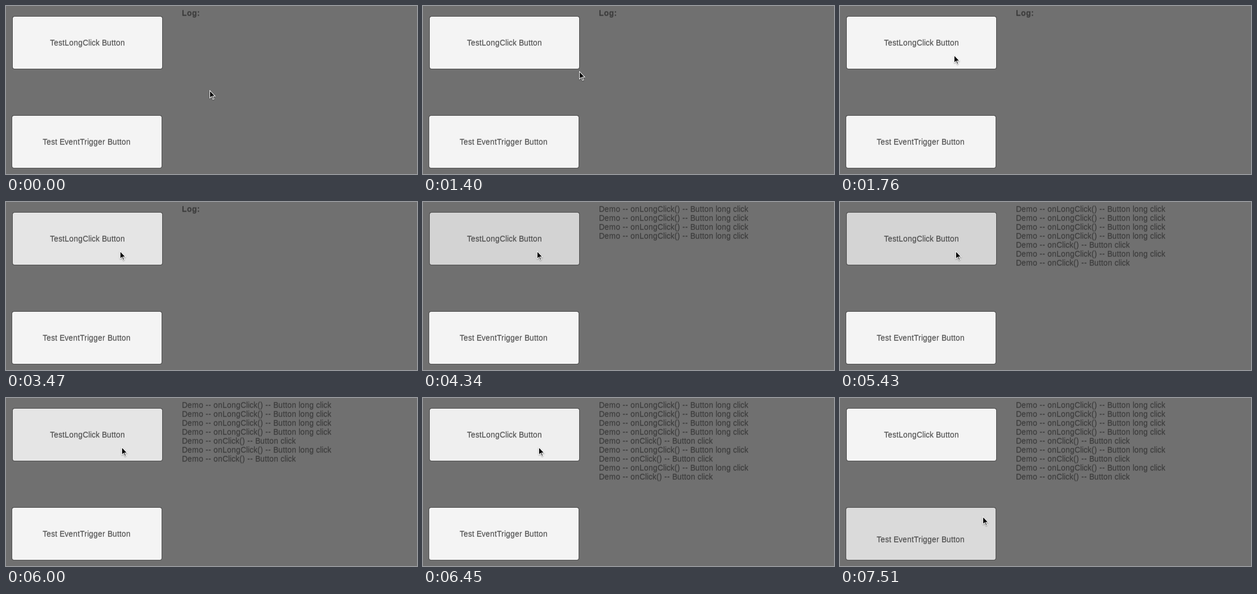
Animation, 729 px wide and 300 px high, one loop 8 s. Source, as an HTML page with a canvas:

```html
<!DOCTYPE html>
<html lang="en">
<head>
<meta charset="utf-8">
<title>Long click demo</title>
<style>
  html, body { margin: 0; width: 100%; height: 100%; overflow: hidden; background: #707070; }
  canvas { display: block; }
</style>
</head>
<body>
<canvas id="stage" width="729" height="300"></canvas>
<script>
const ctx = document.getElementById('stage').getContext('2d');
const LOOP = 8000;
const FONT = '14px "Liberation Sans", Arial, sans-serif';
const IDLE = 244, PRESSED = 211;
const HOLD_DELAY = 220, REPEAT = 210;

const longPresses = [
  { down: 3470, up: 4420 },
  { down: 5010, up: 5430 },
  { down: 6000, up: 6400 }
];
const triggerPresses = [{ down: 7480, up: Infinity }];

const moves = [
  { start: 750, end: 1760, from: [361, 150], bend: [282, 118], to: [202, 87] },
  { start: 4820, end: 4870, from: [202, 87], bend: [203, 87], to: [205, 87] },
  { start: 6620, end: 6970, from: [205, 87], bend: [316, 155], to: [253, 211] }
];

// Holding repeats the long click; letting go adds a click
const log = longPresses.flatMap(({ down, up }) => {
  const lines = [];
  for (let time = down + HOLD_DELAY; time < up; time += REPEAT) {
    lines.push({ time, text: 'Demo -- onLongClick() -- Button long click' });
  }
  return [...lines, { time: up, text: 'Demo -- onClick() -- Button click' }];
});

const clamp = u => Math.min(1, Math.max(0, u));

// Slow start, quick late middle, soft stop
function ease(u) {
  const v = clamp(u) ** 1.5;
  return v * v * v * (v * (6 * v - 15) + 10);
}

function shadeAt(presses, t) {
  const press = presses.findLast(p => t >= p.down);
  if (!press) return IDLE;
  const depth = t < press.up
    ? clamp((t - press.down + 40) / 90)
    : 1 - clamp((t - press.up) / 60);
  return Math.round(IDLE + (PRESSED - IDLE) * depth);
}

function pointerAt(t) {
  const { start, end, from, bend, to } = moves.findLast(m => t >= m.start) || moves[0];
  const u = ease((t - start) / (end - start)), v = 1 - u;
  return from.map((a, i) => Math.round(v * v * a + 2 * v * u * bend[i] + u * u * to[i]));
}

// Kerned advances snapped to whole pixels
function advances(text) {
  const width = s => ctx.measureText(s).width;
  return [...text].map((ch, i) => {
    const next = text[i + 1] || '';
    return Math.round(width(ch + next) - width(next));
  });
}

// Two overlapping passes give the soft vertical edges
function drawText(text, x, y) {
  ctx.fillStyle = 'rgba(50, 50, 50, 0.6)';
  advances(text).forEach((step, i) => {
    for (const lift of [0, 1]) ctx.fillText(text[i], x, y - lift);
    x += step;
  });
}

function fillBox(x, y, w, h, radius, color) {
  ctx.fillStyle = color;
  ctx.beginPath();
  ctx.roundRect(x, y, w, h, radius);
  ctx.fill();
}

function drawButton(x, y, shade, label, shift) {
  const w = 265, h = 93;
  fillBox(x - 1, y - 1, w + 2, h + 2, 4, 'rgba(0, 0, 0, 0.32)');
  fillBox(x, y, w, h, 3.5, `rgb(${shade}, ${shade}, ${shade})`);
  ctx.font = FONT;
  const width = advances(label).reduce((sum, step) => sum + step, 0);
  drawText(label, Math.floor(x + (w - width) / 2), y + 52 + shift);
}

function drawLog(t) {
  const shown = log.filter(line => t >= line.time);
  ctx.font = shown.length ? FONT : 'bold ' + FONT;
  if (!shown.length) drawText('Log:', 312, 18);
  shown.forEach((line, i) => drawText(line.text, 312, 18 + i * 16));
}

function drawPointer(x, y) {
  const arrow = [[1, 2.3], [1, 13.3], [3.9, 10.7], [6.3, 16.2], [7.2, 15.8], [4.9, 10.4], [8.8, 10.4]];
  ctx.save();
  ctx.translate(x, y);
  ctx.beginPath();
  for (const point of arrow) ctx.lineTo(...point);
  ctx.closePath();
  ctx.shadowColor = 'rgba(0, 0, 0, 0.4)';
  ctx.shadowBlur = 2;
  ctx.shadowOffsetY = 1;
  ctx.lineWidth = 2;
  ctx.strokeStyle = '#fff';
  ctx.stroke();
  ctx.shadowColor = 'transparent';
  ctx.fillStyle = '#000';
  ctx.fill();
  ctx.restore();
}

function draw(t) {
  ctx.fillStyle = '#707070';
  ctx.fillRect(0, 0, 729, 300);
  const shift = t >= triggerPresses[0].down ? 10 : 0;
  drawButton(12, 19, shadeAt(longPresses, t), 'TestLongClick Button', 0);
  drawButton(11, 196, shadeAt(triggerPresses, t), 'Test EventTrigger Button', shift);
  drawLog(t);
  drawPointer(...pointerAt(t));
}

const begin = performance.now();
function tick() {
  draw((performance.now() - begin) % LOOP);
  requestAnimationFrame(tick);
}
tick();
</script>
</body>
</html>
```
